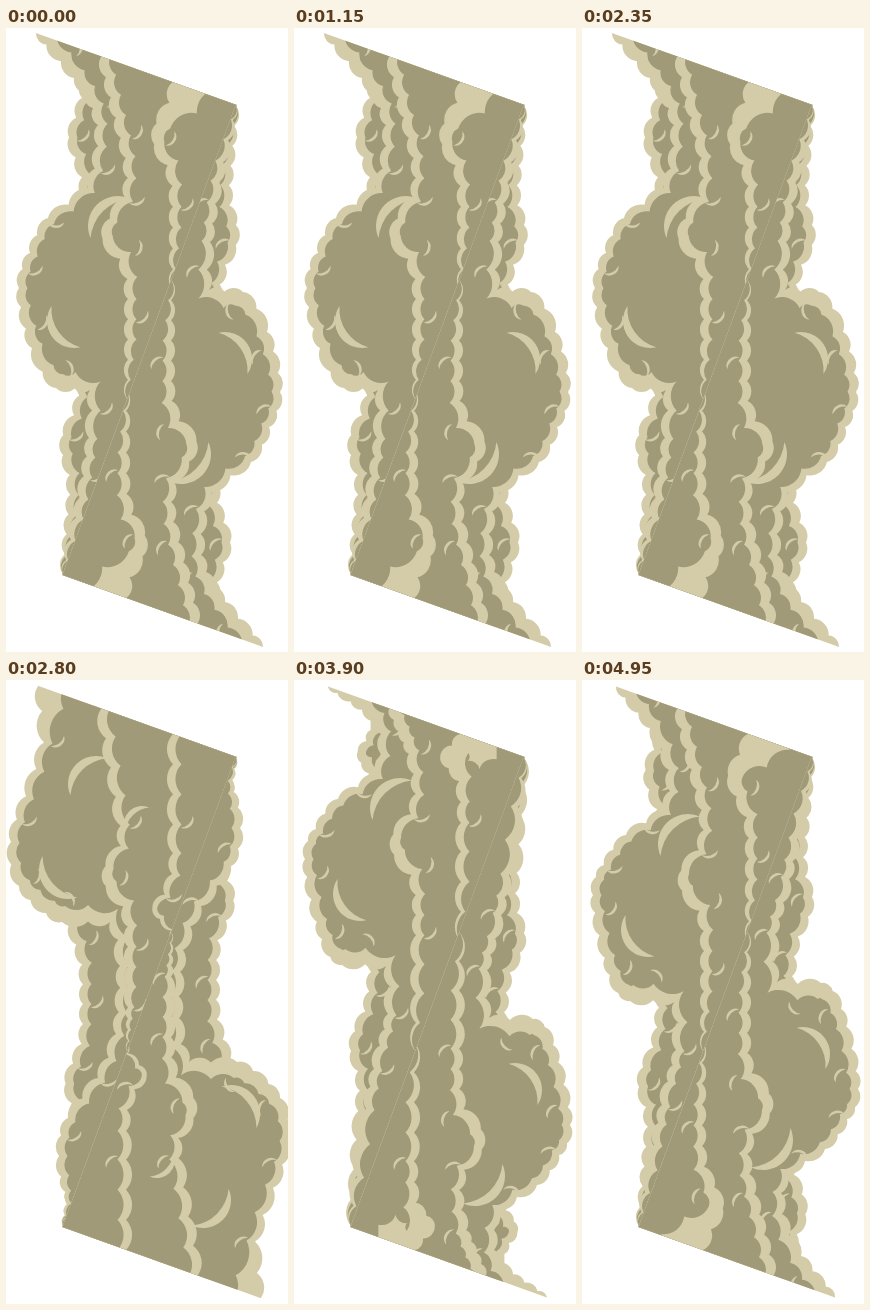
Recreate the animation shown at these times as an HTML page with a canvas. Size 282 by 624 pixels, loop 5 s.

```html
<!DOCTYPE html>
<html>
<head>
<meta charset="utf-8">
<style>
html, body { margin: 0; width: 100%; height: 100%; overflow: hidden; background: #fff; }
canvas { display: block; }
</style>
</head>
<body>
<canvas id="stage" width="282" height="624"></canvas>
<script>
const ctx = document.getElementById('stage').getContext('2d');
const CREAM = '#d4cca8', OLIVE = '#a09a78';

// outline: x, y down the billowing edge; back, mid, front: heights of puffs
// on the other layers; marks: x, y, radius, angle of the large crescents.
const rising = {
  outline: [30,5, 68,50, 92,97, 82,160, 42,190, 24,225, 13,260, 26,320, 50,360, 84,362, 83,410, 74,470, 57,546],
  back: [110, 415], mid: [205], front: 108, frontCap: 36, cap: 0,
  marks: [68,293,27,145, 112,198,30,225]
};
const lifted = {
  outline: [34,7, 68,48, 87,90, 82,130, 44,155, 22,185, 11,215, 28,295, 48,321, 92,322, 94,370, 80,425, 57,546],
  back: [95, 400], mid: [200], front: 98, frontCap: 36, cap: 0,
  marks: [66,250,27,145, 106,164,30,225]
};
const crowned = {
  outline: [32,6, 38,45, 20,82, 5,126, 13,170, 56,206, 104,206, 114,250, 110,318, 92,362, 62,402, 53,440, 62,505, 57,546],
  back: [208, 365], mid: [160], front: 203, frontCap: 0, cap: 24,
  marks: [62,154,29,140, 90,68,28,225, 136,108,18,225]
};
const budding = {
  outline: [30,5, 27,42, 16,90, 3,122, 25,158, 65,170, 98,162, 113,225, 106,290, 94,335, 50,385, 36,415, 55,462, 57,546],
  back: [190, 350], mid: [130], front: 183, frontCap: 0, cap: 22,
  marks: [53,112,30,150, 82,48,24,195, 134,88,14,215, 122,364,26,215, 88,446,26,145]
};
const swelling = {
  outline: [33,6, 24,50, 34,93, 62,104, 98,130, 112,215, 88,260, 52,297, 34,345, 20,370, 10,402, 46,434, 66,462, 57,546],
  back: [125, 172], mid: [118, 246], front: 165, frontCap: 0, cap: 4,
  marks: [79,399,34,140, 80,14,34,150, 126,88,14,150, 115,290,24,200]
};

// Twelve drawings per cycle: pose and vertical drift.
const cycle = [
  [rising, 0], [rising, -20], [lifted, 0], [lifted, -36], [crowned, 36], [crowned, 0],
  [crowned, -20], [budding, 0], [budding, -32], [swelling, 0], [swelling, -26], [rising, 26]
];

const puffs = (y, centers, width) =>
  centers.reduce((sum, c) => sum + Math.exp(-(((y - c) / width) ** 2)), 0);

function column(top, bottom, xAt) {
  const n = Math.round((bottom - top) / 20);
  return Array.from({ length: n + 1 }, (_, i) => {
    const y = top + (bottom - top) * i / n;
    return { x: xAt(y), y };
  });
}

// Smooth curve through the outline, cut into pieces of scallop length.
function billow(flat) {
  const at = i => {
    const k = Math.min(flat.length / 2 - 1, Math.max(0, i)) * 2;
    return [flat[k], flat[k + 1]];
  };
  const pts = [];
  for (let i = 0; i < flat.length / 2 - 1; i++) {
    const a = at(i - 1), b = at(i), c = at(i + 1), d = at(i + 2);
    const n = Math.max(1, Math.round(Math.hypot(c[0] - b[0], c[1] - b[1]) / 21));
    for (let j = 0; j < n; j++) {
      const t = j / n;
      const [x, y] = [0, 1].map(k => b[k] + t / 2 * (c[k] - a[k] +
        t * (2 * a[k] - 5 * b[k] + 4 * c[k] - d[k] + t * (3 * (b[k] - c[k]) + d[k] - a[k]))));
      pts.push({ x, y });
    }
  }
  const [x, y] = at(flat.length / 2 - 1);
  return [...pts, { x, y }];
}

function shift(pts, drift) {
  const top = pts[0].y, bottom = pts[pts.length - 1].y;
  return pts.map(({ x, y }) => {
    const grip = Math.min(1, Math.max(0, Math.min(y - top, bottom - y) / 80));
    return { x, y: y + drift * grip };
  });
}

// Inner edge: the rim is thicker on undersides and fades out at the foot.
function inset(pts, cap) {
  const top = pts[0].y, bottom = pts[pts.length - 1].y;
  return pts.map((p, i) => {
    const a = pts[Math.max(0, i - 1)], b = pts[Math.min(pts.length - 1, i + 1)];
    const dx = b.x - a.x, dy = b.y - a.y, len = Math.hypot(dx, dy) || 1;
    const nx = dy / len, ny = -dx / len;
    const rim = (8.5 + 8 * Math.max(0, -ny)) * Math.min(1, (bottom - p.y) / 60)
      + cap * Math.max(0, 1 - (p.y - top) / 50);
    return { x: p.x + nx * rim, y: p.y + ny * rim, angle: Math.atan2(ny, nx) };
  });
}

function fillScallops(pts, color) {
  const first = pts[0], last = pts[pts.length - 1];
  let d = `M400 -99L${first.x} -99L${first.x} ${first.y}`;
  pts.slice(1).forEach((p, i) => {
    const r = Math.hypot(p.x - pts[i].x, p.y - pts[i].y) * 0.72;
    d += `A${r} ${r} 0 0 0 ${p.x} ${p.y}`;
  });
  ctx.fillStyle = color;
  ctx.fill(new Path2D(d + `L${last.x} 700L400 700Z`));
}

function fillCrescent(x, y, r, angle) {
  const point = a => `${x + r * Math.cos(angle + a)} ${y + r * Math.sin(angle + a)}`;
  const inner = r * 1.45;
  ctx.fillStyle = CREAM;
  ctx.fill(new Path2D(`M${point(-1.2)}A${r} ${r} 0 0 1 ${point(1.2)}A${inner} ${inner} 0 0 0 ${point(-1.2)}`));
}

function drawLayer(pts, drift, cap, hookPhase) {
  const edge = shift(pts, drift), inner = inset(edge, cap);
  fillScallops(edge, CREAM);
  fillScallops(inner, OLIVE);
  inner.slice(2, -4).forEach((p, i) => {
    if (i % 3 !== hookPhase) return;
    fillCrescent(p.x + 3 * Math.cos(p.angle), p.y - 5, 9, p.angle + 0.8);
  });
}

function drawHalf(pose, drift) {
  ctx.save();
  ctx.clip(new Path2D('M-168 -66L230.5 77L57.5 546.5L-141 475Z'));
  const back = column(50, 546, y => 77 - Math.max(0, y - 330) / 10.8 - 14 * puffs(y, pose.back, 24));
  const mid = column(29, 372, y => 95 + 27 * Math.min(1, (y - 29) / 110) - 27 * puffs(y, pose.mid, 23));
  const front = column(54, 262, y => 167 - 21 * puffs(y, [pose.front], 25));
  drawLayer(back, drift, 0, 1);
  drawLayer(billow(pose.outline), drift, pose.cap, 0);
  drawLayer(mid, drift, 0, 2);
  drawLayer(front, drift, pose.frontCap, 1);
  for (let i = 0; i < pose.marks.length; i += 4) {
    const [x, y, r, degrees] = pose.marks.slice(i, i + 4);
    fillCrescent(x, y + drift, r, degrees * Math.PI / 180);
  }
  ctx.restore();
}

function draw(now) {
  const tick = Math.floor(now % 5000 / 50);
  const [pose, drift] = cycle[Math.floor((tick + 1) / 2) % 12];
  ctx.setTransform(1, 0, 0, 1, 0, 0);
  ctx.fillStyle = '#fff';
  ctx.fillRect(0, 0, 282, 624);
  drawHalf(pose, drift);
  // The other half is the same plume turned upside down.
  ctx.setTransform(-1, 0, 0, -1, 287, 624);
  drawHalf(pose, drift);
}

const start = performance.now();
function loop() {
  draw(performance.now() - start);
  requestAnimationFrame(loop);
}
loop();
</script>
</body>
</html>
```
